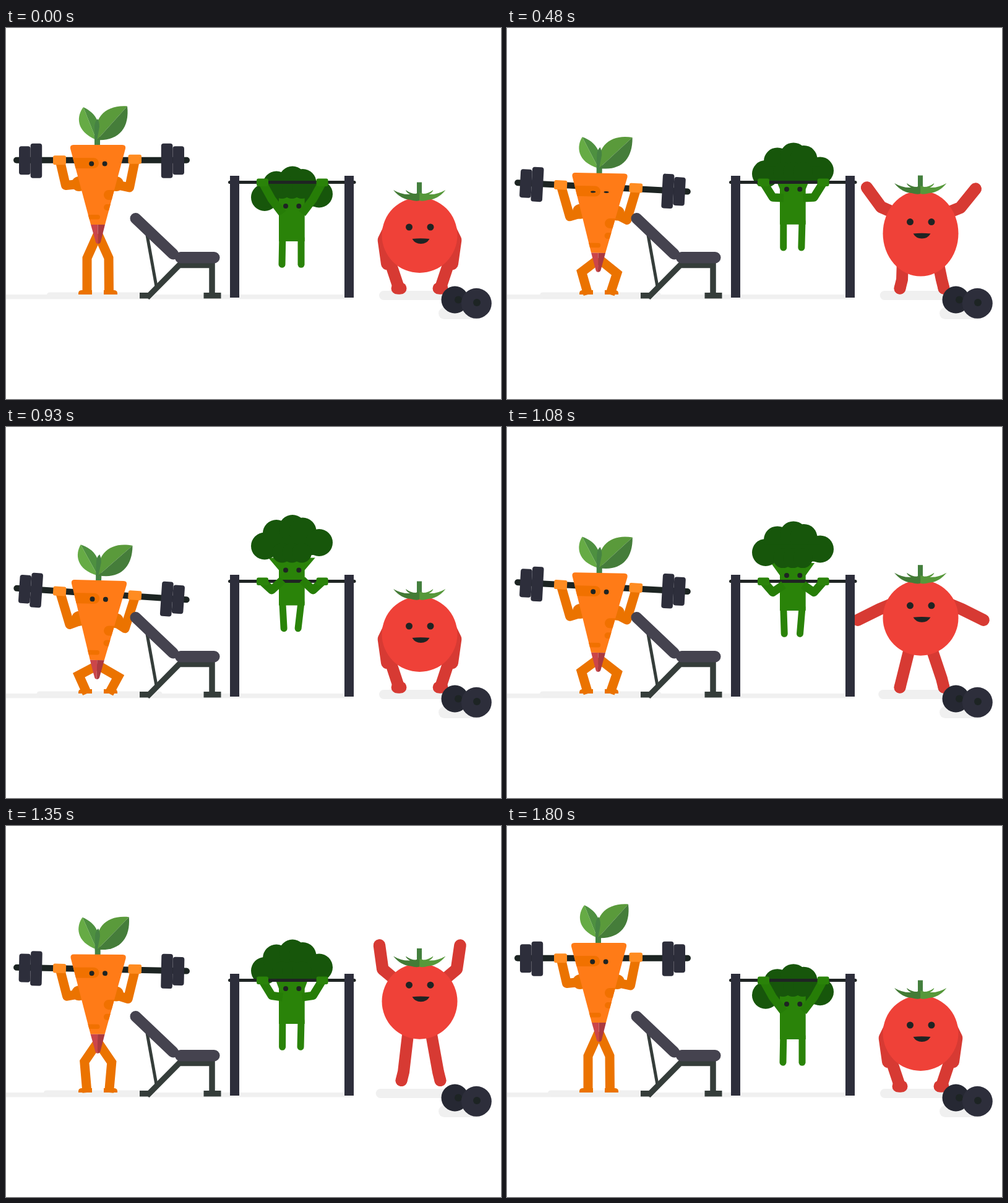
These frames come from a looping animation (800 by 600 pixels, 1830 ms). An HTML page with a canvas:

```html
<!DOCTYPE html>
<html lang="en">
<head>
<meta charset="utf-8">
<title>Vegetable gym</title>
<style>
html, body { margin: 0; width: 100%; height: 100%; overflow: hidden; background: #fff; }
canvas { display: block; width: 800px; height: 600px; }
</style>
</head>
<body>
<canvas id="stage" width="800" height="600"></canvas>
<script>
const LOOP = 1830, JUMP = LOOP / 2;
const ctx = document.getElementById('stage').getContext('2d');
const INK = '#1f2423', IRON = '#2d2e3b', SHADE = '#f0f0f0';
const ORANGE = '#ff7b17', DEEP_ORANGE = '#eb7300', RED = '#ef4138', DEEP_RED = '#d73a33';
const GREEN = '#2a8309', ARM_GREEN = '#267d07', DARK_GREEN = '#17560b';

const clamp = s => Math.min(1, Math.max(0, s));

// Sine ease from 0 to 1, beginning at start and lasting span.
const ease = (t, start, span) => (1 - Math.cos(Math.PI * clamp((t - start) / span))) / 2;

function fill(color, d) {
  ctx.fillStyle = color;
  ctx.fill(new Path2D(d));
}

function oval(color, x, y, rx, ry = rx) {
  ctx.fillStyle = color;
  ctx.beginPath();
  ctx.ellipse(x, y, rx, ry, 0, 0, 7);
  ctx.fill();
}

function box(color, x, y, w, h, r = 0) {
  ctx.fillStyle = color;
  ctx.beginPath();
  ctx.roundRect(x, y, w, h, r);
  ctx.fill();
}

function limb(color, width, points, cap = 'round', join = 'round') {
  ctx.strokeStyle = color;
  ctx.lineWidth = width;
  ctx.lineCap = cap;
  ctx.lineJoin = join;
  ctx.beginPath();
  points.forEach(p => ctx.lineTo(...p));
  ctx.stroke();
}

function group(x, y, degrees, draw) {
  ctx.save();
  ctx.translate(x, y);
  ctx.rotate(degrees * Math.PI / 180);
  draw();
  ctx.restore();
}

// Turns the drawing about a fixed point.
function turned(x, y, degrees, draw) {
  group(x, y, degrees, () => { ctx.translate(-x, -y); draw(); });
}

function mirrored(axis, draw) {
  ctx.save();
  ctx.translate(2 * axis, 0);
  ctx.scale(-1, 1);
  draw();
  ctx.restore();
}

// The point at a distance, the angle opening to the left from straight down.
function reach([x, y], length, degrees) {
  const a = degrees * Math.PI / 180;
  return [x - length * Math.sin(a), y + length * Math.cos(a)];
}

function carrotLeaves(p) {
  box('#468343', 143, 176, 9, 16);
  turned(147, 181, -9.6 * p, () => {
    fill('#4e9040', 'M125 128C147 138 156 158 146 181Z');
    fill('#66ab45', 'M125 128C114 142 112 167 146 181Z');
  });
  turned(147, 181, 6 * p, () => {
    fill('#5a9a3b', 'M196 126.5C160 124 139 146 147 181Z');
    fill('#457d3a', 'M196 126.5C200 162 182 183 147 181Z');
  });
  fill('#468343', 'M143 182V160Q143 152 148 147Q151 152 151 160L147 182Z');
}

function carrotBody(p, lid) {
  carrotLeaves(p);
  const shape = new Path2D('M109 189H188Q194 189 193 195L160 318H137L104 195Q103 189 109 189Z');
  ctx.save();
  ctx.fillStyle = ORANGE;
  ctx.fill(shape);
  ctx.clip(shape);
  const spot = (x, y, w, h) => box('#f17100', x, y, w, h, h / 2);
  spot(95, 210, 55, 17);
  spot(158, 262, 40, 16);
  spot(158, 285, 30, 10);
  spot(120, 302, 32, 7.5);
  ctx.restore();
  fill('#cb464a', 'M137 318H148.5V349Q146 349 145 346Z');
  fill('#ab3a40', 'M148.5 318H160L153 346Q152 349 148.5 349Z');
  for (const x of [138.2, 159.6]) oval(INK, x, 219.5, 4, 4 * lid);
}

function carrot(t) {
  const p = ease(t, 0, 755) - ease(t, 755, 935);
  const lid = 1 - .62 * (ease(t, 100, 140) - ease(t, 620, 200));
  box(SHADE, 66 - 18 * p, 427.5, 170 + 36 * p, 9, 4.5);

  const withBar = draw => group(154.5, 213.8 + 61.5 * p, 4.2 * p, draw);
  withBar(() => {
    limb('#1c2422', 10, [[-137.5, 0], [137.5, 0]]);
    for (const side of [-1, 1]) {
      box(IRON, side * 124.2 - 9.3, -22.5, 18.6, 46, 4);
      box(IRON, side * 105.6 - 9.3, -27, 18.6, 56, 4);
    }
  });

  const skin = (points, join) => limb(DEEP_ORANGE, 15, points, 'butt', join);
  skin([[88, 218 + 56 * p], [96.5 + 7 * p, 254.5 + 71 * p], [122, 252 + 66 * p]]);
  skin([[208, 216 + 66 * p], [199.5 - 8 * p, 258 + 74 * p], [176, 253 + 68 * p]]);
  oval(DEEP_ORANGE, 118, 252 + 63 * p, 12);
  oval(DEEP_ORANGE, 178, 252 + 67 * p, 12);

  const hip = [148.5, 333 + 57 * p];
  skin([hip, [131 - 14.5 * p, 372 + 32 * p], [131, 431]], 'miter');
  skin([hip, [166 + 16.5 * p, 372 + 35 * p], [166.5, 431]], 'miter');
  const foot = () => fill(DEEP_ORANGE, 'M117 431V429Q117 424 123 424H139V431Z');
  foot();
  mirrored(148.5, foot);

  group(0, 64.5 * p, 0, () => turned(148.5, 270, 1.6 * p, () => carrotBody(p, lid)));

  withBar(() => {
    box('#ff8c21', -78.5, -7.5, 21, 15, 3);
    box('#ff8c21', 43, -9, 21.5, 15, 3);
  });
}

function bench() {
  const frame = '#353d3a', pad = '#45434f';
  limb(frame, 5, [[228, 335], [243, 418]], 'butt');
  limb(frame, 9.5, [[228, 436], [280, 383.5], [333, 383.5], [333, 432]], 'butt', 'miter');
  fill(frame, 'M216 428H233L238 431L232 437.5H216Z');
  box(frame, 319.5, 428, 28, 9.5);
  limb(pad, 18, [[209.5, 308], [270, 365.5]]);
  box(pad, 273, 362, 72.5, 18.5, 9.2);
}

function broccoli(t) {
  // A small sag, the pull, then a slower way down on which the head lags.
  const fall = clamp((t - 770) / 1050);
  const lift = 66 * ease(t, 190, 580) - 60 * ease(t, 770, 1050) - 6 * ease(t, 0, 190);
  const eye = 288 - lift;
  const top = eye - 64.5 - .4 * lift - 5 * Math.sin(Math.PI * fall);
  const bend = (lift / 60) ** 2;

  const flare = Math.max(0, .3 * lift);
  fill(GREEN, `M${441 - flare} ${eye - 20}H${482.7 + flare}L482.7 ${eye}H441Z`);
  const lobe = (x, y, r = 22) => oval(DARK_GREEN, x, top + y, r);
  lobe(418, 50.5);
  lobe(437, 30);
  lobe(463, 22);
  lobe(479.5, 26.5);
  lobe(506, 45);
  box(DARK_GREEN, 418, top + 38, 88, 27);

  limb(GREEN, 11, [[446.8, eye + 52], [446 + 3.5 * bend, eye + 94.3]]);
  limb(GREEN, 11, [[477, eye + 52], [477 - 5.5 * bend, eye + 94.3]]);
  box(GREEN, 441, eye - 16, 41.7, 73);
  for (const x of [446, 462, 478]) oval(DARK_GREEN, x, eye - 28, 16);
  for (const x of [452, 473.3]) oval(INK, x, eye, 4);

  limb(INK, 5, [[361.5, 249.5], [563, 249.5]]);
  const arm = () => {
    limb(ARM_GREEN, 13.5, [[414.5, 250], [429.5, 277 - 15 * bend], [447, 300 - .93 * lift]], 'butt');
    box(GREEN, 405, 243.5, 19, 12.5, 3);
  };
  arm();
  mirrored(462.8, arm);
  for (const x of [362, 547]) box(IRON, x, 239, 15, 197);
}

function calyx(y) {
  box('#437f3d', 664, y - 24.5, 8, 27);
  const half = color => fill(color, `M626 ${y - 12}Q640 ${y - 4} 653 ${y - 5}Q647 ${y - 8} 646 ${y - 12}`
    + `Q654 ${y - 6} 662 ${y - 6}L668.2 ${y - 8}V${y + 5}Q663 ${y + 7} 654 ${y + 4}Q638 ${y + 3} 626 ${y - 12}Z`);
  half('#437b36');
  mirrored(668.2, () => half('#56983a'));
}

function tomatoArm(y, raise) {
  const shoulder = [620 + 6 * raise, y - 12 - 28 * raise];
  const elbow = reach(shoulder, 22, 26 + 112 * raise);
  const hand = reach(elbow, 39, -8 + 194 * raise);
  limb(DEEP_RED, 19.5, [shoulder, elbow, hand]);
}

function tomato(time) {
  const t = time % JUMP, x = 668.5;
  const apex = 372;
  const air = t < apex ? ease(t, 30, 342) : Math.max(0, 1 - ((t - apex) / 111) ** 2);
  const stretch = 8.5 * Math.exp(-(((t - 485) / 25) ** 2));
  const crouch = 1 - ease(t, 0, 160) + ease(t, 490, 110);
  const y = 335 - 77 * air;
  const raise = (rest, power) => ease(t, 92, 178) * (1 - clamp((t - 415) / rest)) ** power;

  box(SHADE, 603 - 8 * air, 425, 131 + 16 * air, 15, 7.5);

  const footY = Math.min(421, y + 118 + 10 * ease(t, apex, 60));
  const leg = splay => {
    const foot = 635 + .43 * (421 - footY) - splay;
    const hip = [650 - 10 * crouch - 1.3 * stretch, y + 52 - 20 * crouch];
    const knee = [foot + 3.5 - 18.5 * crouch, footY - 14 - 31 * crouch];
    limb(DEEP_RED, 19, [hip, knee, [foot, footY]]);
    limb(DEEP_RED, 19, [[foot - 3 * crouch, footY], [foot + 3 * crouch, footY]]);
  };
  leg(0);
  tomatoArm(y, raise(465, 1.6));
  mirrored(x, () => {
    leg(4 * (1 - crouch));
    tomatoArm(y, raise(285, 1));
  });

  oval(RED, x, y, 61, 61 + stretch);
  calyx(y - 61 - stretch);
  const eye = y - 13 - 20 * air - .6 * stretch, mouth = eye + 19;
  for (const ex of [651.5, 686]) oval(INK, ex, eye, 5.5);
  fill(INK, `M656.5 ${mouth}Q670 ${mouth - 1.5} 684.5 ${mouth}Q680 ${mouth + 8} 670.5 ${mouth + 8}`
    + `Q661 ${mouth + 8} 656.5 ${mouth}Z`);
}

function dumbbell() {
  oval('#262833', 725.5, 439.5, 22);
  oval('#1d2424', 731, 439.5, 6);
  oval(IRON, 760.3, 445.3, 24.5);
  oval('#1d2424', 761, 444, 6);
}

function draw(t) {
  ctx.fillStyle = '#fff';
  ctx.fillRect(0, 0, 800, 600);
  box(SHADE, -10, 431, 572, 7.5, 3);
  box(SHADE, 699, 452, 72, 19, 9.5);
  carrot(t);
  bench();
  tomato(t);
  broccoli(t);
  dumbbell();
}

const start = performance.now();
function tick() {
  draw((performance.now() - start) % LOOP);
  requestAnimationFrame(tick);
}
tick();
</script>
</body>
</html>
```
